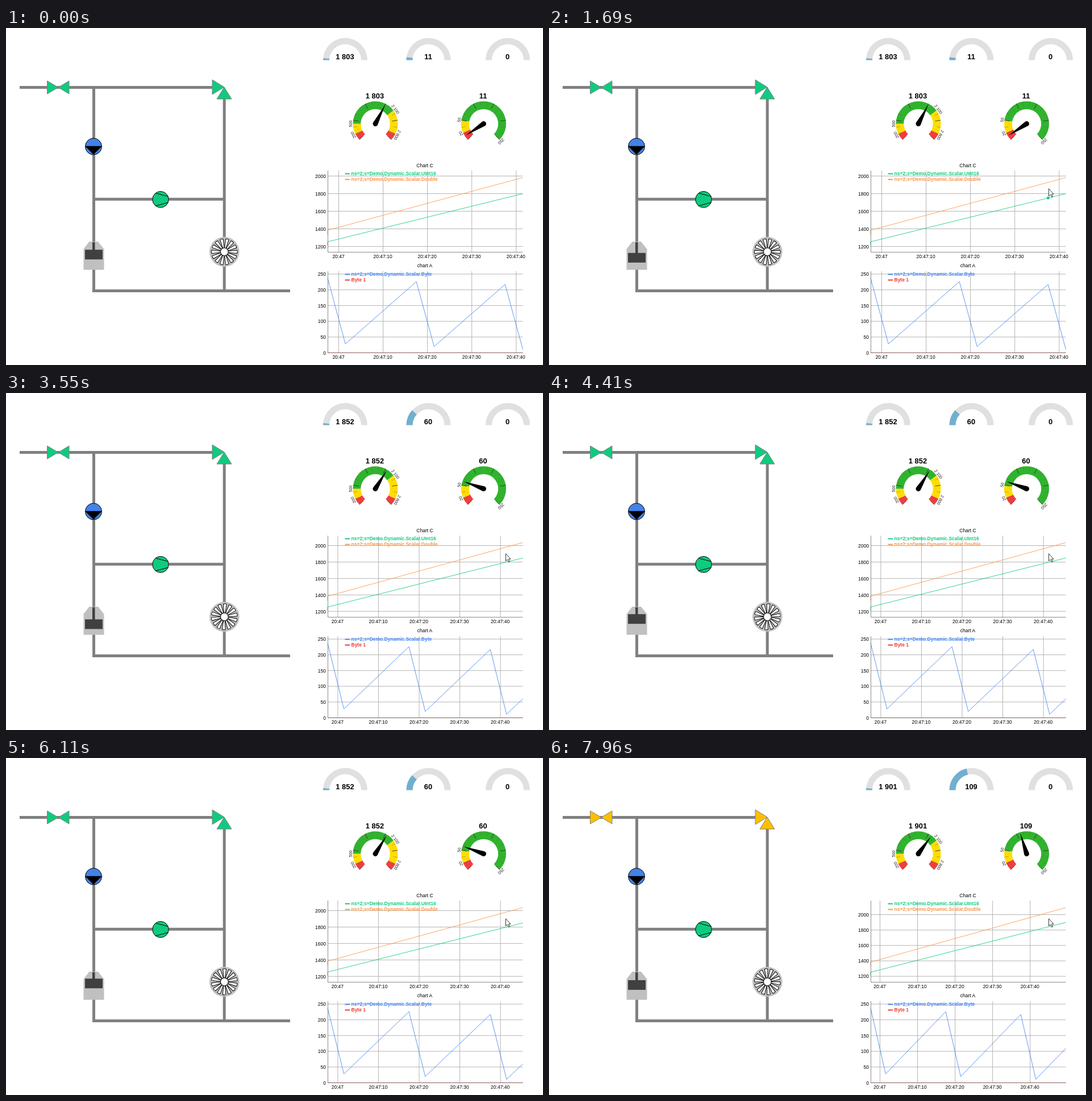
An HTML page for the animation above (8000 ms loop, 945 px wide and 593 px high).

```html
<!DOCTYPE html>
<html lang="en">
<head>
<meta charset="utf-8">
<title>Process dashboard</title>
<style>
html, body { margin: 0; width: 100%; height: 100%; overflow: hidden; background: #fff; }
svg { display: block; width: 945px; height: 593px; font-family: "Liberation Sans", Arial, sans-serif; }
.pipe { fill: none; stroke: #808080; stroke-width: 5; }
.valve { stroke: #808080; stroke-width: 1; }
.value { font-size: 12.9px; font-weight: bold; text-anchor: middle; }
.small { font-size: 8.5px; }
.mid { text-anchor: middle; }
.end { text-anchor: end; }
.legend { font-size: 8.5px; font-weight: bold; }
.zone { font-size: 7.3px; text-anchor: middle; fill: #222; }
.grid { stroke: #b4b4b4; stroke-width: 1; fill: none; }
.axis { stroke: #666; stroke-width: 1; fill: none; }
.series { fill: none; stroke-width: 0.85; }
</style>
</head>
<body>
<svg id="stage" viewBox="0 0 945 593">
  <path class="pipe" d="M24 104.5H363M154.5 104.5V465M154.5 301.2H384M384.2 125V462.5M152 462.5H500"/>
  <g id="valves" class="valve">
    <path d="M72.5 93V116L92 104.5ZM111 93V116L92 104.5Z"/>
    <path d="M363 91V117L384 104ZM371 125H397L384 104Z"/>
  </g>
  <circle cx="154" cy="208.500" r="14.500" fill="#4283ea" stroke="#000"/>
  <path d="M139.500 208H168.500L154 222.500Z" stroke="#000" stroke-width="0.500"/>
  <circle cx="272" cy="301.700" r="14.200" fill="#0fcb7f" stroke="#000"/>
  <path d="M263 290.500L285.500 296.500M263 313L285.500 307" stroke="#000"/>
  <path d="M146.500 376H162L172.500 389V425.500H136.500V389Z" fill="#c0c0c0"/>
  <rect id="rod" x="152" y="377" width="4.500" fill="#404040"/>
  <rect id="piston" x="139" width="31" height="17" fill="#404040"/>
  <circle cx="384.300" cy="393.800" r="26.300" fill="#c0c0c0"/>
  <g id="fan"></g>
  <g id="gauges"></g>
  <g id="charts"></g>
  <circle id="dot" cx="878.300" cy="299" r="2.500" fill="#0fcb7f"/>
  <path id="cursor" d="M0 0V13L3 10.300L5.100 15L7 14.200L5 9.500H8.500Z" fill="#fff" stroke="#222" stroke-width="0.9"/>
</svg>
<script>
const LOOP = 8000;
const FIRST = 2800, IDLE = 6500, SECOND = 6900, COUNT_TIME = 700;
const GREEN = '#0fcb7f', ORANGE = '#fb9548', BLUE = '#4285f4', RED = '#ef3b30';
const $ = id => document.getElementById(id);

function add(parent, tag, attrs, text) {
  const node = document.createElementNS('http://www.w3.org/2000/svg', tag);
  for (const key in attrs) node.setAttribute(key, attrs[key]);
  if (text !== undefined) node.textContent = text;
  parent.appendChild(node);
  return node;
}

function polar(cx, cy, r, deg) {
  const a = deg * Math.PI / 180;
  return `${(cx + r * Math.cos(a)).toFixed(2)} ${(cy + r * Math.sin(a)).toFixed(2)}`;
}

function ring(cx, cy, outer, inner, from, to) {
  const big = to - from > 180 ? 1 : 0;
  return `M${polar(cx, cy, outer, from)}A${outer} ${outer} 0 ${big} 1 ${polar(cx, cy, outer, to)}` +
    `L${polar(cx, cy, inner, to)}A${inner} ${inner} 0 ${big} 0 ${polar(cx, cy, inner, from)}Z`;
}

const format = n => String(Math.round(n)).replace(/\B(?=(\d{3})+$)/g, ' ');

function halfGauge(cx, max) {
  const g = $('gauges'), cy = 56.5;
  add(g, 'path', { d: ring(cx, cy, 39, 28, 180, 360), fill: '#e0e0e0' });
  const arc = add(g, 'path', { fill: '#70b0ce' });
  const label = add(g, 'text', { class: 'value', x: cx - 0.5, y: 55 });
  return value => {
    arc.setAttribute('d', value ? ring(cx, cy, 39, 28, 180, 180 + 180 * value / max) : '');
    label.textContent = format(value);
  };
}

function dial(cx, max, zones, labels) {
  const g = $('gauges'), cy = 168.5, outer = 39.5, width = 13.8;
  const angle = v => 135 + 270 * v / max;
  let from = 0;
  for (const [to, fill] of zones) {
    add(g, 'path', { d: ring(cx, cy, outer, outer - width, angle(from), angle(to)), fill });
    from = to;
  }
  for (let i = 0; i <= 15; i++) {
    const major = i % 3 === 0, deg = 135 + 18 * i;
    const inner = outer - width * (major ? 0.7 : 0.5);
    add(g, 'path', {
      d: `M${polar(cx, cy, outer, deg)}L${polar(cx, cy, inner, deg)}`,
      stroke: major ? '#333' : '#666', 'stroke-width': major ? 0.9 : 0.5
    });
  }
  for (const v of labels) {
    const place = polar(cx, cy, 41, angle(v));
    add(g, 'text', { class: 'zone', transform: `translate(${place}) rotate(${angle(v) + 90})` }, format(v));
  }
  const needle = add(g, 'path', { d: 'M37.5 0L0 -4.5A4.5 4.5 0 0 0 0 4.5Z' });
  const label = add(g, 'text', { class: 'value', x: cx - 1, y: 124 });
  return value => {
    needle.setAttribute('transform', `translate(${cx} ${cy}) rotate(${angle(value)})`);
    label.textContent = format(value);
  };
}

const LEFT = 566, RIGHT = 909.5, START = -2.5;

function chart(title, titleY, top, bottom, legends) {
  const g = $('charts');
  const plot = add(g, 'g');
  add(g, 'text', { class: 'small mid', x: 737, y: titleY }, title);
  legends.forEach(([name, color], i) => {
    const y = top + 8 + 10 * i;
    add(g, 'path', { d: `M596.5 ${y - 2.5}H605`, stroke: color, 'stroke-width': 2 });
    add(g, 'text', { class: 'legend', x: 607.5, y, fill: color }, name);
  });

  // Each line is [color, [[seconds, value], ...]].
  return (end, yOf, ticks, lines) => {
    plot.replaceChildren();
    const xOf = s => LEFT + (s - START) * (RIGHT - LEFT) / (end - START);
    for (const v of ticks) {
      add(plot, 'path', { class: 'grid', d: `M${LEFT} ${yOf(v)}H${RIGHT}` });
      add(plot, 'text', { class: 'small end', x: 563, y: yOf(v) + 3.3 }, v);
    }
    for (let s = 0; s <= 40; s += 10) {
      add(plot, 'path', { class: 'grid', d: `M${xOf(s)} ${top}V${bottom}` });
      add(plot, 'text', { class: 'small mid', x: xOf(s) - 0.5, y: bottom + 10.5 }, '20:47' + (s ? ':' + s : ''));
    }
    for (const [color, points] of lines) {
      add(plot, 'polyline', {
        class: 'series', stroke: color,
        points: points.map(([s, v]) => `${xOf(s).toFixed(2)},${yOf(v).toFixed(2)}`).join(' ')
      });
    }
    add(plot, 'path', {
      class: 'axis', d: `M${LEFT + 0.5} ${top}V${bottom}H${RIGHT}`, 'stroke-opacity': 0.75
    });
  };
}

const BLADES = 14;
for (let i = 0; i < BLADES; i++) {
  add($('fan'), 'path', {
    d: 'M-1.2 -7L-2.9 -22.3Q0 -23.8 2.9 -22.3L1.2 -7Z', fill: '#fff', stroke: '#000',
    'stroke-width': 1, transform: `rotate(${(i + 0.5) * 360 / BLADES})`
  });
}
add($('fan'), 'circle', { r: 5.6, fill: '#fff' });

const good = '#30b32d', warn = '#ffdd00', bad = '#f03e3e';
const wordGauges = [
  halfGauge(597, 65535),
  dial(650, 3000, [[200, bad], [500, warn], [2100, good], [2800, warn], [3000, bad]], [200, 500, 2100, 2800])
];
const byteGauges = [
  halfGauge(743.5, 255),
  dial(840.5, 250, [[20, bad], [50, warn], [250, good]], [20, 50, 250])
];
halfGauge(883, 255)(0);

const prefix = 'ns=2;s=Demo.Dynamic.Scalar.';
const drawC = chart('Chart C', 244.7, 251, 394.5, [[prefix + 'UInt16', GREEN], [prefix + 'Double', ORANGE]]);
const drawA = chart('chart A', 421.2, 428, 571.5, [[prefix + 'Byte', BLUE], ['Byte 1', RED]]);

function plotWords(end) {
  const low = 1212, elapsed = end - START;
  const word = 1253 + 12.43 * elapsed, real = 1384 + 13.6 * elapsed;
  const yOf = v => 382.5 - (v - low) * 119.3 / (real - low);
  drawC(end, yOf, [1200, 1400, 1600, 1800, 2000], [
    [GREEN, [[START, low], [START, 1253], [end, word]]],
    [ORANGE, [[START, 1332], [START, 1384], [end, real]]]
  ]);
}

function plotBytes(end, last) {
  const saw = [[START, 237], [1.5, 28], [17.5, 226], [21.5, 20], [37.5, 217], [41.5, 11]];
  if (last > 41.5) saw.push([last, 11 + 12.3 * (last - 41.5)]);
  drawA(end, v => 571.5 - v * 0.554, [0, 50, 100, 150, 200, 250], [
    [RED, [[START, 0], [end, 0]]],
    [BLUE, saw]
  ]);
}

const clamp = n => Math.min(1, Math.max(0, n));
const easeOut = (t, start) => 1 - (1 - clamp((t - start) / COUNT_TIME)) ** 2;

let phase = -1;
function setPhase(next) {
  if (next === phase) return;
  phase = next;
  const last = [41.5, 45.5, 45.5, 49.5][phase];
  plotWords(last);
  plotBytes(phase === 2 ? 49.1 : last, last);
  $('valves').setAttribute('fill', phase === 3 ? '#ffbf00' : GREEN);
}

function render(t) {
  setPhase(t < FIRST ? 0 : t < IDLE ? 1 : t < SECOND ? 2 : 3);

  const gain = 49 * (easeOut(t, FIRST) + easeOut(t, SECOND));
  wordGauges.forEach(set => set(1803 + gain));
  byteGauges.forEach(set => set(11 + gain));

  const lift = Math.abs((t + 1765) % 2000 / 1000 - 1);
  const y = 404 - 18 * lift;
  $('piston').setAttribute('y', y);
  $('rod').setAttribute('height', y - 376);

  $('fan').setAttribute('transform', `translate(384.3 393.8) rotate(${t % 3000 / 3000 * 365})`);

  const enter = clamp((t - 1300) / 240);
  $('cursor').setAttribute('transform', `translate(${887 - 7.5 * enter} ${270 + 12.7 * enter})`);
  $('cursor').style.display = t < 1300 ? 'none' : '';
  $('dot').style.display = t >= 1300 && t < FIRST ? '' : 'none';
}

const began = performance.now();
function frame() {
  render((performance.now() - began) % LOOP);
  requestAnimationFrame(frame);
}
frame();
</script>
</body>
</html>
```
